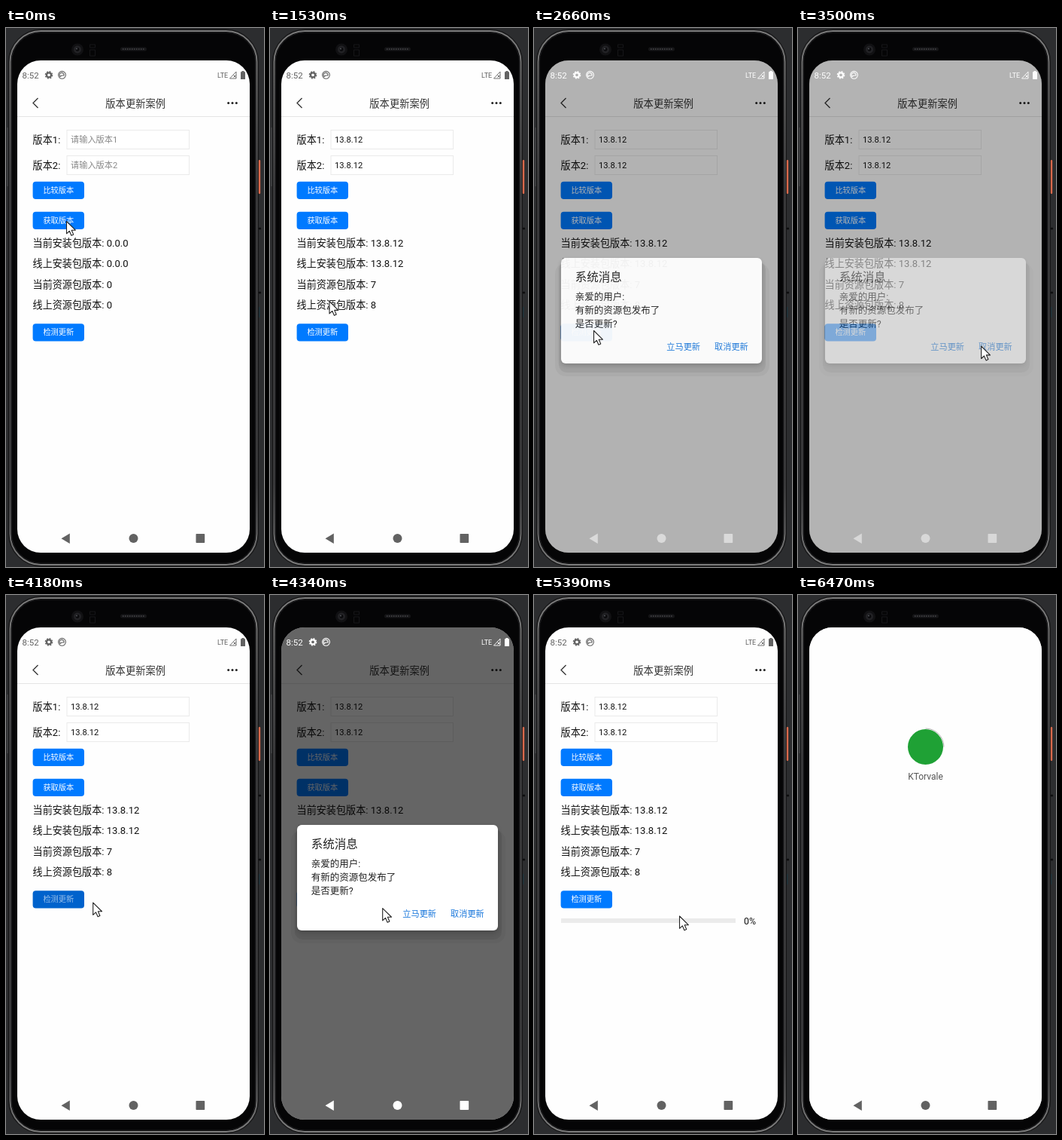
Write an HTML page that moves like this. It is 343 px wide and 715 px high and loops after 6650 ms.

```html
<!DOCTYPE html>
<html lang="zh-CN">
<head>
<meta charset="utf-8">
<title>版本更新案例</title>
<style>
html, body { margin: 0; width: 100%; height: 100%; overflow: hidden; background: #2c2d2f; }
svg { display: block; width: 343px; height: 715px; }
text { font-family: Roboto, "Noto Sans CJK SC", "Noto Sans CJK", "Noto Sans", sans-serif; white-space: pre; }
</style>
</head>
<body>
<svg id="stage" viewBox="0 0 343 715" xmlns="http://www.w3.org/2000/svg">
  <defs>
    <linearGradient id="rim" x1="0" y1="0" x2="0" y2="1">
      <stop offset="0" stop-color="#7c7c7c"/>
      <stop offset=".1" stop-color="#686868"/>
      <stop offset=".3" stop-color="#48484a"/>
      <stop offset=".85" stop-color="#48484a"/>
      <stop offset="1" stop-color="#7c7c7c"/>
    </linearGradient>
    <clipPath id="screen"><rect x="15" y="43" width="309" height="653" rx="31"/></clipPath>
    <filter id="soft" x="-20%" y="-20%" width="140%" height="140%"><feGaussianBlur stdDeviation="3"/></filter>
  </defs>

  <rect width="343" height="715" fill="#2c2d2f"/>
  <rect x="1" y="132" width="3" height="78" fill="#3c3d3f"/>
  <rect x="4" y="2.5" width="331" height="711" rx="43" fill="#050506" stroke="#161617" stroke-width="2"/>
  <rect x="5.500" y="4" width="328" height="708" rx="41" fill="none" stroke="url(#rim)" stroke-width="2"/>
  <rect x="7.500" y="6" width="324" height="704" rx="39" fill="#050506" stroke="#1e1e20"/>
  <rect x="335.8" y="175" width="2.400" height="45" rx="1" fill="#d9694c"/>
  <g fill="#0c0c0d"><circle cx="337.500" cy="266" r="1.600"/><circle cx="337.500" cy="351" r="1.600"/></g>
  <rect x="336" y="370" width="1.500" height="14" fill="#20343c"/>
  <circle cx="95" cy="28.500" r="8" fill="#111113"/>
  <circle cx="95" cy="28.500" r="5" fill="#222225"/>
  <circle cx="95" cy="28.500" r="2.400" fill="#0b0b0d"/>
  <circle cx="94" cy="27.500" r="1" fill="#55565c"/>
  <path d="M111.500 22h7v4h-7zM111.500 29h7v8h-7z" fill="none" stroke="#161618"/>
  <rect x="152" y="25.500" width="35" height="5" rx="2.500" fill="#161618"/>
  <path d="M155 28h30" stroke="#3c3c3f" stroke-width="2" stroke-dasharray="1.500 1.500"/>

  <g clip-path="url(#screen)">
    <rect x="15" y="43" width="309" height="653" fill="#fefefe"/>
    <g id="page">
      <path d="M42.500 93l-6.500 6.500 6.500 6.500" fill="none" stroke="#333" stroke-width="1.300"/>
      <g fill="#222"><circle cx="295.700" cy="99.500" r="1.500"/><circle cx="301" cy="99.500" r="1.500"/><circle cx="306.300" cy="99.500" r="1.500"/></g>
      <path d="M15 117.500h309" stroke="#e4e4e4"/>
      <g fill="#fff" stroke="#eaeaea"><rect x="81" y="135.500" width="162.500" height="25"/><rect x="81" y="169.500" width="162.500" height="25"/></g>
    </g>
    <g id="bar">
      <rect x="36" y="429" width="232" height="6" fill="#ebebeb"/>
      <rect id="fill" x="36" y="429" height="6" fill="#007aff"/>
    </g>
    <g id="splash">
      <rect x="15" y="43" width="309" height="653" fill="#fefefe"/>
      <circle cx="169.500" cy="201.500" r="23.500" fill="#1fa135"/>
      <path id="arc" d="M169.500 177a24.500 24.500 0 0 1 24.500 24.500" fill="none" stroke="#b5b5b5"/>
    </g>
    <rect id="dim" x="15" y="43" width="309" height="653"/>
    <g id="dialog">
      <rect x="28" y="312" width="285" height="150" rx="14" opacity=".04"/>
      <rect x="33" y="310" width="275" height="147" rx="10" opacity=".07"/>
      <rect x="36" y="308" width="267" height="140" rx="6" opacity=".2" filter="url(#soft)"/>
      <rect x="36" y="305" width="267" height="140" rx="6" fill="#fff"/>
    </g>
    <g id="status">
      <circle cx="57" cy="62.300" r="3" fill="none" stroke="currentColor" stroke-width="2.200"/>
      <circle cx="57" cy="62.300" r="4.600" fill="none" stroke="currentColor" stroke-width="1.400" stroke-dasharray="2 1.610"/>
      <circle cx="74.500" cy="62.300" r="4.900" fill="none" stroke="currentColor" stroke-width="1.100"/>
      <path d="M72 64.500a3 3 0 1 1 5-1.500h-3z" fill="none" stroke="currentColor" stroke-width="1.200"/>
      <path d="M297.500 67l8.500-9v9z" fill="none" stroke="currentColor" stroke-width=".9"/>
      <path d="M302.500 62.500l3 3m0-3l-3 3" stroke="currentColor" stroke-width=".9"/>
      <path d="M312 58.200h1.500v-1.200h3v1.200h1.500v9.800h-6z" fill="currentColor"/>
    </g>
    <g id="nav" fill="currentColor">
      <path d="M73.500 677.300l11.300-6.700v13.400z"/>
      <circle cx="169.500" cy="677" r="6"/>
      <rect x="252.500" y="671" width="11.700" height="12" rx=".8"/>
    </g>
  </g>
  <path id="cursor" d="M0 0V16.300L3.800 12.800 6.400 18.700 9.200 17.400 6.700 11.700H11.800Z" fill="#fff" stroke="#222" stroke-width="1.100" stroke-linejoin="round"/>
</svg>
<script>
const LOOP = 6650, NS = 'http://www.w3.org/2000/svg';
const $ = id => document.getElementById(id);
const clamp = v => Math.max(0, Math.min(1, v));

function add(parent, tag, attrs) {
  const el = document.createElementNS(NS, tag);
  for (const k in attrs) el.setAttribute(k, attrs[k]);
  return $(parent).appendChild(el);
}
// Places text by its left edge (or anchor) and the middle of its line.
function label(parent, x, mid, size, str, fill, anchor = 'start') {
  const el = add(parent, 'text', { x, y: mid + size * 0.37, 'font-size': size, fill, 'text-anchor': anchor });
  el.textContent = str;
  return el;
}
function button(y, str) {
  const box = add('page', 'rect', { x: 35.6, y, width: 68.4, height: 23.3, rx: 4 });
  const txt = label('page', 69.8, y + 11.5, 10.2, str, '#fff', 'middle');
  return down => {
    box.setAttribute('fill', down ? '#0062cc' : '#007aff');
    txt.setAttribute('fill-opacity', down ? 0.6 : 1);
  };
}

label('page', 172.2, 100.4, 13.3, '版本更新案例', '#333', 'middle');
label('page', 35.6, 147.8, 13.1, '版本1:', '#111');
label('page', 35.6, 182.5, 13.1, '版本2:', '#111');
const inputs = [147.5, 182].map(y => label('page', 86, y, 11.2, '', '#888'));
const infoNames = ['当前安装包版本', '线上安装包版本', '当前资源包版本', '线上资源包版本'];
const infos = [285.4, 312.5, 339.7, 366.9].map(y => label('page', 35.6, y, 13.1, '', '#111'));
button(203.7, '比较版本')(false);
const fetchBtn = button(243.7, '获取版本');
const checkBtn = button(392.2, '检测更新');
const percent = label('bar', 279, 432, 12.4, '', '#111');

label('splash', 169.5, 241, 12, 'KTorvale', '#555', 'middle');

label('dialog', 54.7, 330.5, 15.5, '系统消息', '#222');
['亲爱的用户:', '有新的资源包发布了', '是否更新?'].forEach((s, i) =>
  label('dialog', 54.7, 356 + i * 18.4, 12.5, s, '#222'));
label('dialog', 176.3, 423, 11.2, '立马更新', '#1a78dc');
label('dialog', 240, 423, 11.2, '取消更新', '#1a78dc');

label('status', 21.5, 62.8, 11.5, '8:52', 'currentColor');
label('status', 281, 62.3, 9, 'LTE', 'currentColor');

// time, x, y
const path = [
  [0, 80.5, 256.5], [1290, 80.5, 256.5], [1410, 77, 302], [1530, 79, 362.5], [1710, 78.5, 391], [1920, 79.5, 401.5],
  [2690, 79.5, 401.5], [2900, 150, 413], [3090, 235, 421], [3230, 259, 424],
  [3470, 259, 424], [3640, 175, 414], [3780, 100, 405], [3860, 87, 403],
  [4060, 87, 403], [4180, 115.5, 408], [4340, 149.5, 415.5], [4510, 184, 424], [4630, 193.5, 426],
  [5400, 193.5, 426], [5590, 197, 326], [5680, 199, 330], [5880, 206, 530], [6050, 214, 690], [6110, 217, 725]
];
function cursorAt(t) {
  const i = path.findIndex(p => p[0] > t);
  if (i < 0) return path[path.length - 1].slice(1);
  const a = path[i - 1], b = path[i], k = (t - a[0]) / (b[0] - a[0]);
  return [a[1] + (b[1] - a[1]) * k, a[2] + (b[2] - a[2]) * k];
}

// open and close times of the dialog
const shows = [[2600, 3410], [4190, 4910]];
function dialogLevel(t) {
  const s = shows.find(([open, close]) => t >= open && t < close + 180);
  if (!s) return [0, 0];
  const rise = clamp((t - s[0] + 30) / 180);
  const fall = 1 - clamp((t - s[1]) / 180);
  return [rise * fall, Math.min(1, rise * 1.86) * fall];
}
const within = (t, a, b) => t >= a && t < b;
function tint(id, k) {
  const tone = Math.round(98 + 157 * k);
  $(id).style.color = `rgb(${tone},${tone},${tone})`;
}

function draw(t) {
  const local = t >= 800, online = t >= 890;
  const pack = '13.8.12';
  inputs.forEach((el, i) => {
    const on = i ? online : local;
    el.textContent = on ? pack : '请输入版本' + (i + 1);
    el.setAttribute('fill', on ? '#111' : '#888');
  });
  const values = [local ? pack : '0.0.0', online ? pack : '0.0.0', local ? 7 : 0, online ? 8 : 0];
  infos.forEach((el, i) => { el.textContent = infoNames[i] + ': ' + values[i]; });

  fetchBtn(within(t, 650, 980));
  checkBtn(within(t, 2290, 2630) || within(t, 4030, 4260));

  const done = t >= 6080 ? 1 : Math.floor(99 * clamp((t - 5390) / 650)) / 100;
  $('bar').setAttribute('visibility', t >= 5390 ? 'visible' : 'hidden');
  $('fill').setAttribute('width', 232 * done);
  percent.textContent = Math.round(done * 100) + '%';

  const [dim, box] = dialogLevel(t);
  $('dim').setAttribute('opacity', 0.6 * dim);
  $('dialog').setAttribute('opacity', box);
  tint('status', Math.min(1, dim * 2));
  tint('nav', Math.pow(dim, 0.4));

  const splash = clamp((t - 6170) / 120);
  $('splash').setAttribute('opacity', splash);
  $('status').setAttribute('opacity', 1 - splash);
  const turn = (Math.min(t, 6470) - 6470) * 0.5;
  $('arc').setAttribute('transform', `rotate(${turn} 169.5 201.5)`);

  $('cursor').setAttribute('transform', `translate(${cursorAt(t)})`);
}

const start = performance.now();
function tick() {
  draw((performance.now() - start) % LOOP);
  requestAnimationFrame(tick);
}
tick();
</script>
</body>
</html>
```
